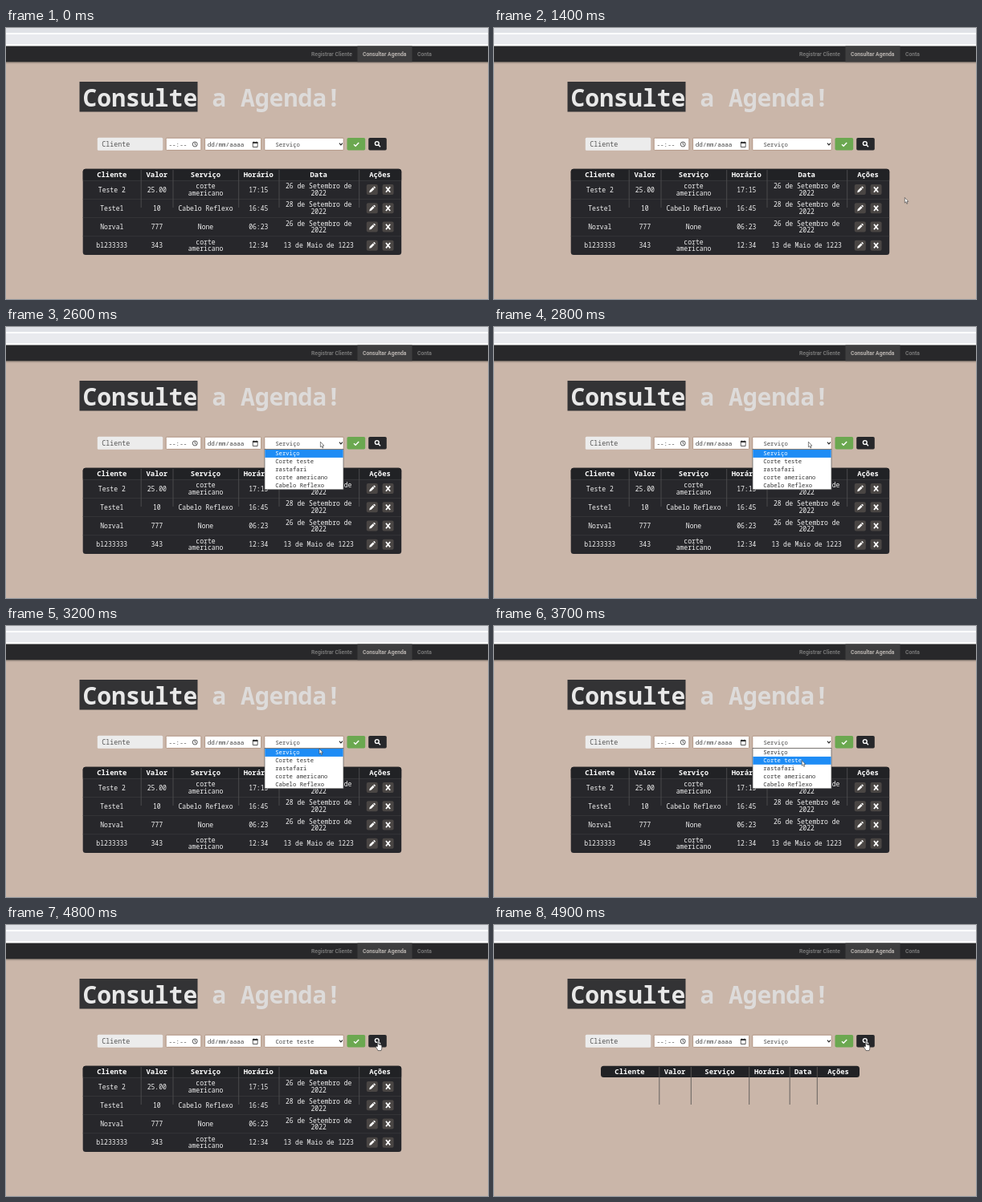
Write an HTML page that moves like this. It is 600 px wide and 338 px high and loops after 5000 ms.

```html
<!DOCTYPE html>
<html lang="pt">
<head>
<meta charset="utf-8">
<title>Consultar Agenda</title>
<style>
  html, body { margin: 0; width: 100%; height: 100%; overflow: hidden; background: #cab6a9; }
  svg { display: block; width: 100%; height: 100%; }
  text { font-family: "Roboto Mono", "Noto Sans Mono", "DejaVu Sans Mono", monospace; white-space: pre; }
  .nav { font-family: Roboto, Arial, sans-serif; font-weight: 700; }
</style>
</head>
<body>
<svg id="stage" viewBox="0 0 600 338" xmlns="http://www.w3.org/2000/svg">
  <defs>
    <linearGradient id="fade" x2="0" y2="1">
      <stop offset="0" stop-color="#000" stop-opacity=".3"/>
      <stop offset="1" stop-color="#000" stop-opacity="0"/>
    </linearGradient>
    <g id="edit">
      <rect x="-7" y="-6.5" width="14" height="13" rx="2" fill="#4a4644"/>
      <path d="M-3.6 3.6l.6-2.5 3.9-3.9 1.9 1.9-3.9 3.9zM1.4-3.3l.6-.6q.5-.4 1 0l.9.9q.4.5 0 1l-.6.6z" fill="#fff"/>
    </g>
    <g id="remove">
      <rect x="-7" y="-6.5" width="14" height="13" rx="2" fill="#4a4644"/>
      <path d="M-2.6-3.2L2.6 3.2M2.6-3.2L-2.6 3.2" stroke="#fff" stroke-width="1.7"/>
    </g>
  </defs>
  <g id="page"></g>
  <g id="full"></g>
  <g id="empty"></g>
  <g id="picked"></g>
  <g id="menu"></g>
  <path id="arrow" d="M0 0V6.6L1.5 5.3 2.5 7.8 3.6 7.3 2.6 4.9H4.5Z" fill="#fff" stroke="#333" stroke-width=".6"/>
  <path id="hand" d="M-.8 6.6V.8Q-.8 0 0 0T.8.8V4Q1.6 3.6 2.2 4.2 3 3.9 3.5 4.6 4.6 4.4 4.6 5.6V8.4Q4.6 9.6 3.8 11.4H-.2Q-.8 10-2.6 7.5-3 6.5-2.1 6.1-1.4 5.9-.8 6.6Z" fill="#fff" stroke="#222" stroke-width=".6"/>
</svg>
<script>
const $ = id => document.getElementById(id);

const rect = (x, y, w, h, fill, rx = 0, more = "") =>
  `<rect x="${x}" y="${y}" width="${w}" height="${h}" rx="${rx}" fill="${fill}" ${more}/>`;
const text = (x, y, s, size, fill, weight = 400, anchor = "start", cls = "") =>
  `<text x="${x}" y="${y}" font-size="${size}" fill="${fill}" font-weight="${weight}" text-anchor="${anchor}" class="${cls}">${s}</text>`;
const line = (x, y1, y2, color) =>
  `<path d="M${x} ${y1}V${y2}" stroke="${color}" stroke-width=".9"/>`;
const field = (x, w) =>
  rect(x, 137.2, w, 15.2, "#fff", 1, 'stroke="#a58470" stroke-width=".8"');

function drawPage() {
  const ink = "#444";
  return rect(0, 0, 600, 338, "#cab6a9")
    + rect(0, 0, 600, 23, "#fff")
    + rect(0, 0, 600, 6, "#e0e2e7")
    + rect(0, 8, 600, 12, "#e9eaee")
    + rect(0, 42, 600, 3, "url(#fade)")
    + rect(0, 22.5, 600, 19.8, "#28282a")
    + rect(437.5, 22.5, 68, 19.8, "#3e3e3f")
    + text(380, 34.6, "Registrar Cliente", 6.75, "#777", 700, "start", "nav")
    + text(444, 34.6, "Consultar Agenda", 6.75, "#b9b4b0", 700, "start", "nav")
    + text(512, 34.6, "Conta", 6.75, "#777", 700, "start", "nav")
    + rect(91.5, 67, 147, 37.5, "#333335")
    + text(95.5, 97.5, "Consulte", 29.75, "#e8e8e8", 700)
    + text(256.2, 97.5, "a Agenda!", 29.75, "#dddbda", 700)
    + rect(113.8, 136.8, 81.4, 16, "#ececec", 1.5)
    + text(119.3, 147.8, "Cliente", 8.3, "#555", 300)
    + field(199.2, 43.6)
    + text(202.5, 147.6, "--:--", 7.6, ink)
    + `<g fill="none" stroke="#333" stroke-width=".8"><circle cx="235.2" cy="145" r="3"/><path d="M235.2 143V145.2L236.7 146.2"/></g>`
    + field(247.6, 70)
    + text(250.8, 147.6, "dd/mm/aaaa", 7.6, ink)
    + `<path d="M307.3 142.5h5.8v6h-5.8zM308.6 141.5v1M311.8 141.5v1" fill="none" stroke="#333" stroke-width=".8"/>`
    + rect(307, 142.2, 6.4, 1.8, "#333")
    + field(321.8, 98.4)
    + `<path d="M414.9 143.7L416.9 145.9 418.9 143.7" fill="none" stroke="#222" stroke-width="1.1"/>`
    + rect(424.5, 137, 22.7, 15.6, "#6ba850", 1.8)
    + `<path d="M433 145.2L435.1 147.2 439.2 142.9" fill="none" stroke="#fff" stroke-width="1.4"/>`
    + rect(451.2, 137, 22.6, 15.6, "#26272a", 1.8)
    + `<g fill="none" stroke="#fff" stroke-width="1.4"><circle cx="461.8" cy="144" r="2.4"/><path d="M463.6 145.8L466 148.2"/></g>`;
}

const titles = ["Cliente", "Valor", "Serviço", "Horário", "Data", "Ações"];
const heads = centers => titles.map((s, i) =>
  text(centers[i], 186.2, s, 8.9, "#fff", 700, "middle")).join("");

const rows = [
  ["Teste 2", "25.00", "corte|americano", "17:15", "26 de Setembro de|2022"],
  ["Teste1", "10", "Cabelo Reflexo", "16:45", "28 de Setembro de|2022"],
  ["Norval", "777", "None", "06:23", "26 de Setembro de|2022"],
  ["bl233333", "343", "corte|americano", "12:34", "13 de Maio de 1223"],
];

function cell(x, y, s) {
  const parts = s.split("|");
  return parts.map((p, i) =>
    text(x, y + 2.9 + (i - (parts.length - 1) / 2) * 8.6, p, 8.1, "#f2f2f2", 500, "middle")).join("");
}

function drawFull() {
  const xs = [131.8, 187.8, 248.5, 314.3, 389.2, 465.5];
  let out = rect(95.7, 175.7, 396.5, 107.3, "#27272b", 3.5)
    + `<path d="M95.7 189.6V179.2q0-3.5 3.5-3.5H488.7q3.5 0 3.5 3.5V189.6z" fill="#212225"/>`;
  for (const y of [190, 213.3, 236.3, 259.4]) out += rect(95.7, y, 396.5, .7, "#3a3a3d");
  for (const x of [168.2, 208, 289.7, 340, 439.7]) out += line(x, 177, 224, "#505052");
  out += heads(xs);
  rows.forEach((r, i) => {
    const y = 201.6 + i * 23.2;
    r.forEach((s, j) => out += cell(xs[j], y, s));
    out += `<use href="#edit" x="455.8" y="${y}"/><use href="#remove" x="475.6" y="${y}"/>`;
  });
  return out;
}

function drawEmpty() {
  let out = rect(133, 175.7, 322, 14.3, "#212225", 3.5);
  for (const x of [205.8, 245.3, 317.7, 368.2, 402.3]) out += line(x, 177, 224, "#5c5856");
  return out + heads([169, 225, 281, 342.6, 384.6, 428.6]);
}

const services = ["Serviço", "Corte teste", "rastafari", "corte americano", "Cabelo Reflexo"];
const drawMenu = hot => rect(322, 152.4, 98, 50.4, "#fff", 0, 'stroke="#555" stroke-width=".7"')
  + services.map((s, i) => {
    const y = 153 + i * 9.9;
    return (i === hot ? rect(322.4, y, 97.2, 9.9, "#1e8cf5") : "")
      + text(335.2, y + 7.4, s, 7.25, i === hot ? "#fff" : "#333");
  }).join("");

// time, x, y of the pointer tip
const path = [
  [1400, 511.3, 211.5], [1500, 502, 219], [1600, 479, 221], [1700, 445, 212],
  [1800, 408, 196], [1900, 382, 183], [2000, 382, 177], [2100, 386.3, 169],
  [2200, 389, 157], [2300, 391, 147], [2400, 391.4, 143.2], [3100, 391.4, 143.2],
  [3200, 390, 153], [3300, 387, 164], [3400, 384.5, 171], [3500, 384.5, 171],
  [3700, 383.2, 167.6], [3900, 383.2, 167.6], [4000, 389, 162], [4100, 406, 155],
  [4200, 430, 149], [4300, 452, 146], [4400, 463.2, 145.2], [5000, 463.2, 145.2],
];

function pointer(t) {
  const i = path.findIndex(p => p[0] > t);
  const [a, x, y] = path[i - 1], [b, u, v] = path[i];
  const k = (t - a) / (b - a);
  return [x + (u - x) * k, y + (v - y) * k];
}

const show = (id, on) => $(id).setAttribute("visibility", on ? "visible" : "hidden");

function render(t) {
  const done = t >= 4900;
  show("full", !done);
  show("empty", done);

  const choice = t >= 3900 && !done ? 1 : 0;
  $("picked").innerHTML = text(335.4, 147.6, services[choice], 7.25, "#444");

  const open = t >= 2600 && t < 3900;
  $("menu").innerHTML = open ? drawMenu(t < 3300 ? 0 : 1) : "";

  const moving = t >= 1400, click = t >= 4200;
  show("arrow", moving && !click);
  show("hand", click);
  if (moving) $(click ? "hand" : "arrow").setAttribute("transform", `translate(${pointer(t)})`);
}

$("page").innerHTML = drawPage();
$("full").innerHTML = drawFull();
$("empty").innerHTML = drawEmpty();

const start = performance.now();
let last = -1;
function tick() {
  const t = Math.floor((performance.now() - start) % 5000 / 100) * 100;
  if (t !== last) render(last = t);
  requestAnimationFrame(tick);
}
tick();
</script>
</body>
</html>
```
